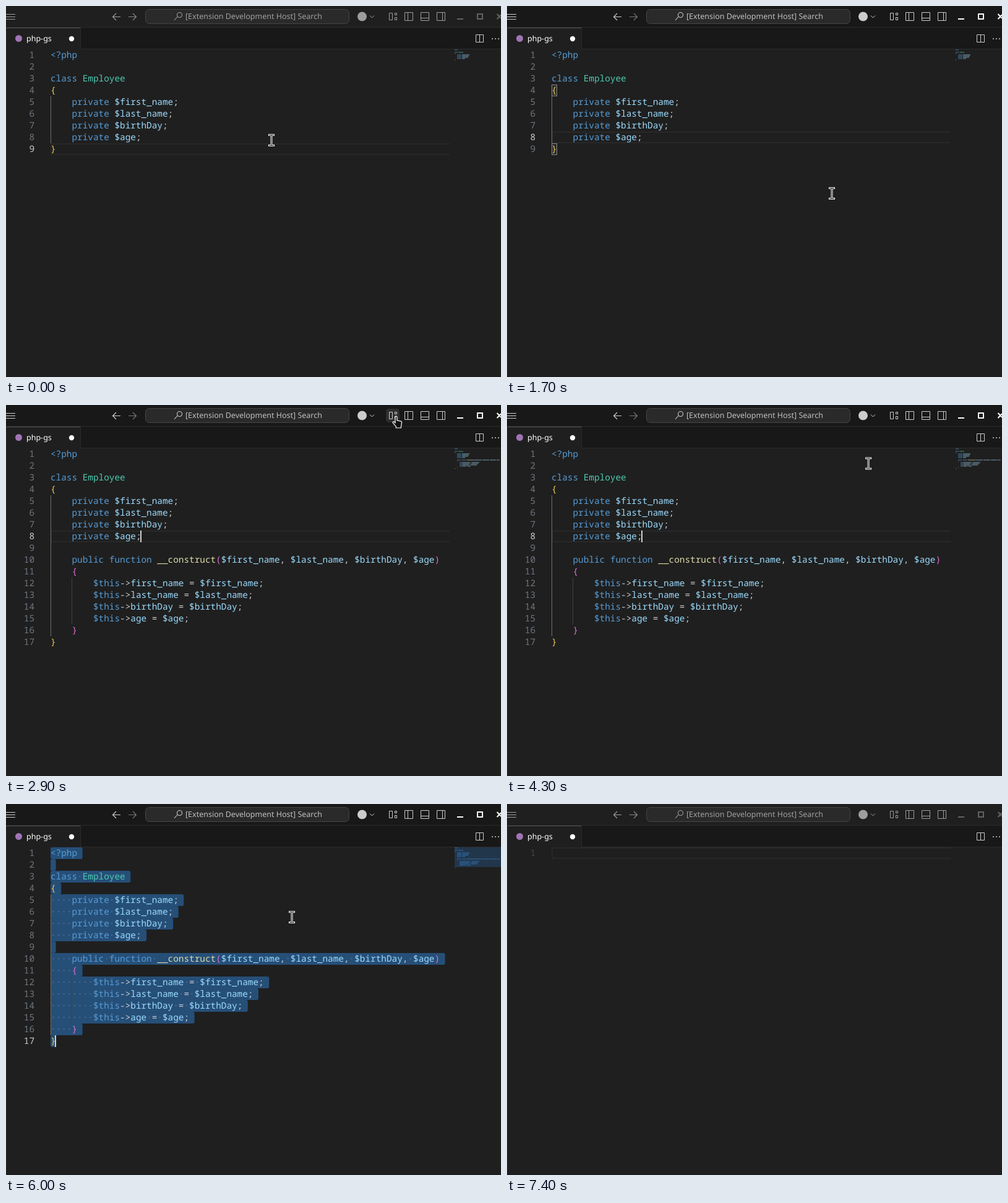
An HTML page for the animation above (8 s loop, 800 px wide and 600 px high).

```html
<!DOCTYPE html>
<html lang="en">
<head>
<meta charset="utf-8">
<title>Generate constructor</title>
<style>
html, body { margin: 0; width: 100%; height: 100%; overflow: hidden; background: #1f1f1f; }
svg { display: block; width: 800px; height: 600px; }
text { font: 12.5px "Noto Sans", "Open Sans", sans-serif; white-space: pre; text-rendering: geometricPrecision; }
.code { font: 14.36px "Noto Sans Mono", "DejaVu Sans Mono", monospace; }
.small { font-size: 11.3px; }
.end { text-anchor: end; }
.mid { text-anchor: middle; }
.popup { filter: drop-shadow(0 0 5px #0009); }
</style>
</head>
<body>
<svg id="stage" viewBox="0 0 800 600"></svg>
<script>
const stage = document.getElementById('stage');
const LOOP = 8000, STEP = 100;
const LEFT = 72, TOP = 70, ROW = 19, CHAR = 8.616;

const fields = ['first_name', 'last_name', 'birthDay', 'age'];
const head = ['<?php', '', 'class Employee', '{', ...fields.map(f => `    private $${f};`)];
const shortCode = [...head, '}'];
const fullCode = [...head, '',
  `    public function __construct(${fields.map(f => '$' + f).join(', ')})`,
  '    {', ...fields.map(f => `        $this->${f} = $${f};`), '    }', '}'];

const menu = [
  [236, 'Change All Occurrences', 'Ctrl+F2'], [262, 'Refactor...', 'Ctrl+Shift+R'],
  [299, 'Generate Constructor', ''], [325, 'Generate Getters', ''],
  [351, 'Generate Setters', ''], [377, 'Generate Getters and Setters', ''],
  [414, 'Cut', 'Ctrl+X'], [440, 'Copy', 'Ctrl+C'], [466, 'Paste', 'Ctrl+V'],
  [503, 'Command Palette...', 'Ctrl+Shift+P']];

// Pointer path: time, x, y
const moves = [
  [0, 429, 217], [900, 429, 217], [1100, 503, 276], [1500, 525, 303], [1700, 525, 303],
  [2300, 638, 52], [2500, 631, 18], [2900, 631, 18], [3000, 676, 23], [3300, 676, 23],
  [3500, 672, 28], [4000, 672, 28], [4700, 467, 183], [5000, 467, 183], [5100, 462, 183],
  [6100, 462, 183], [6600, 820, 120], [LOOP, 820, 120]];

const esc = s => s.replace(/&/g, '&amp;').replace(/</g, '&lt;').replace(/>/g, '&gt;');
const rect = (x, y, w, h, fill, more = '') =>
  `<rect x="${x}" y="${y}" width="${w}" height="${h}" fill="${fill}" ${more}/>`;
const path = (d, stroke, width = 1, fill = 'none') =>
  `<path d="${d}" stroke="${stroke}" stroke-width="${width}" fill="${fill}"/>`;
const text = (x, y, s, fill, cls = '') =>
  `<text x="${x}" y="${y}" fill="${fill}" class="${cls}">${esc(s)}</text>`;
const circle = (x, y, r, fill) => `<circle cx="${x}" cy="${y}" r="${r}" fill="${fill}"/>`;
const rowTop = n => TOP + (n - 1) * ROW;

function pointerAt(t) {
  const i = moves.findIndex(m => m[0] > t);
  const [t0, x0, y0] = moves[i - 1], [t1, x1, y1] = moves[i];
  const k = (t - t0) / (t1 - t0);
  return [x0 + (x1 - x0) * k, y0 + (y1 - y0) * k];
}

function tokens(line) {
  return line.match(/<\?php|\$?\w+|\s+|->|./g) || [];
}

function tokenColor(tok, line) {
  if (/^(<\?php|class|private|public|function|\$this)$/.test(tok)) return '#569cd6';
  if (tok === 'Employee') return '#4ec9b0';
  if (tok === '__construct') return '#dcdcaa';
  if (/^\$?\w/.test(tok)) return '#9cdcfe';
  if (/[{}]/.test(tok) && line.length === 1) return '#e9c94a';
  return /[(){}]/.test(tok) ? '#da70d6' : '#cccccc';
}

function titleBar(focused, hoverX) {
  const fg = focused ? '#cccccc' : '#9d9d9d', win = focused ? '#ffffff' : '#636363';
  const panel = x => `M${x - 6.5} 10.5h13v13h-13z`;
  return rect(0, 0, 800, 35, focused ? '#181818' : '#1f1f1f') + rect(0, 34, 800, 1, '#2b2b2b')
    + (hoverX ? rect(hoverX - 11, 6, 22, 22, '#2f2f2f', 'rx="5"') : '')
    + path('M0 13.5h15M0 17.5h15M0 21.5h15', fg)
    + path('M185 17.5h-12M178 12l-5.5 5.5 5.5 5.5', fg, 1.2)
    + path('M198 17.5h12M205 12l5.5 5.5-5.5 5.5', focused ? '#777777' : '#888888', 1.2)
    + rect(225.5, 5.5, 329, 23, '#2a2a2a', 'rx="6" stroke="#454545"')
    + path('M272 23l5-5.5M276.5 14.5a4 4 0 1 1 8 0a4 4 0 1 1-8 0', fg, 1.1)
    + text(290, 21, '[Extension Development Host] Search', focused ? '#c0c0c0' : '#a0a0a0')
    + circle(575.5, 17, 7.5, fg)
    + path('M588 15.5l3.5 3.5 3.5-3.5', fg)
    + path('M619.5 11.5h5v11h-5zM628.5 11.5h3v3h-3zM628.5 18.5h3v4h-3z', fg)
    + path(panel(651) + 'M649.5 11v12', fg) + path(panel(677) + 'M671 19.5h12', fg)
    + path(panel(703) + 'M705.5 11v12', fg)
    + path('M729 21h10M762 13h8v8h-8zM793.5 13l8 8M793.5 21l8-8', win, 2);
}

function tabBar() {
  return rect(0, 35, 800, 35, '#181818') + rect(0, 69, 800, 1, '#2b2b2b')
    + rect(0, 35, 120, 35, '#1f1f1f') + rect(120, 35, 1, 35, '#2b2b2b')
    + rect(0, 35, 120, 1, '#555555') + rect(0, 35, 1, 565, '#2b2b2b')
    + circle(20.5, 52.5, 5.5, '#a074b4')
    + text(33, 57, 'php-gs', '#ffffff') + circle(106, 53, 4.2, '#ffffff')
    + path('M759.5 46.5h12v12h-12zM765.5 46v13', '#cccccc')
    + [786, 791, 796].map(x => circle(x, 53, 1, '#cccccc')).join('');
}

function minimap(lines, selected, slider) {
  let out = slider ? rect(717, 70, 83, 57, '#797979', `opacity="${.2 * slider}"`) : '';
  if (selected) out += rect(725, 70, 75, lines.length * 2 - 2, '#264f78', 'opacity=".5"');
  lines.forEach((line, i) => {
    let x = 725;
    for (const tok of tokens(line)) {
      if (tok.trim()) {
        const fill = selected ? '#2f6aa3' : tokenColor(tok, line);
        out += rect(x, TOP + i * 2 + .3, tok.length, 1.3, fill, `opacity="${selected ? .8 : .5}"`);
      }
      x += tok.length;
    }
  });
  return out;
}

function editor(lines, active, selected, matched) {
  let out = '';
  if (selected) {
    lines.forEach((line, i) => {
      const cols = line.length + (i < lines.length - 1 ? 1 : 0);
      out += rect(LEFT, rowTop(i + 1), cols * CHAR, ROW, '#264f78', 'rx="3"');
    });
  } else {
    out += path(`M717 ${rowTop(active) + 1}H73v17H717`, '#282828', 2);
  }
  if (lines.length > 1) out += rect(LEFT, rowTop(5), 1, (lines.length - 5) * ROW, '#707070');
  if (lines === fullCode) out += rect(106, rowTop(12), 1, 4 * ROW, '#404040');
  if (matched) {
    for (const n of [4, lines.length])
      out += rect(72.5, rowTop(n) + .5, 8, 18, '#2b2b2b', 'stroke="#888888"');
  }
  lines.forEach((line, i) => {
    const base = rowTop(i + 1) + 14;
    const dim = lines.length === 1 ? '#444444' : '#6e7681';
    const lit = i + 1 === active && lines.length > 1;
    out += text(46, base, String(i + 1), lit ? '#cccccc' : dim, 'code end');
    const spans = tokens(line).map(tok => {
      const blank = !tok.trim();
      const shown = blank && selected ? '·'.repeat(tok.length) : tok;
      return `<tspan fill="${blank ? '#56779a' : tokenColor(tok, line)}">${esc(shown)}</tspan>`;
    });
    out += `<text class="code" x="${LEFT}" y="${base}">${spans.join('')}</text>`;
  });
  return out;
}

function caret(line, col) {
  return rect(Math.floor(LEFT + col * CHAR - 1), rowTop(line), 2, ROW, '#d0d0d0');
}

function contextMenu(y) {
  let out = '<g class="popup">' + rect(428.5, 218.5, 295, 302, '#1f1f1f', 'rx="5" stroke="#454545"') + '</g>'
    + path('M429 280.5h294M429 395.5h294M429 484.5h294', '#454545');
  // The last row the pointer reached stays lit across a separator.
  const hot = y < 223 ? -1 : menu.filter(m => m[0] - 13 <= y).length - 1;
  menu.forEach(([cy, label, keys], i) => {
    const fill = i === hot ? '#ffffff' : '#cccccc';
    if (i === hot) out += rect(433, cy - 13, 286, 26, '#0078d4', 'rx="3"');
    out += text(459, cy + 5, label, fill) + text(693, cy + 5, keys, fill, 'end');
  });
  return out;
}

function checkbox(x, y) {
  return rect(x, y, 13, 13, '#1677e8', 'rx="2"') + path(`M${x + 3} ${y + 6.5}l2.7 3 4.6-6`, '#ffffff', 2);
}

function quickPick(caretOn) {
  let out = '<g class="popup">' + rect(117.5, 6.5, 535, 131, '#222222', 'rx="6" stroke="#3a3a3a"') + '</g>'
    + checkbox(124, 21)
    + rect(142.5, 15.5, 469, 24, '#313131', 'stroke="#0078d4"')
    + text(149, 32, 'Select properties to generate constructor arguments', '#989898')
    + (caretOn ? rect(149, 19, 1, 17, '#cccccc') : '')
    + rect(548, 18, 60, 18, '#616161', 'rx="2"') + text(578, 31, '4 Selected', '#f8f8f8', 'small mid')
    + rect(618, 15, 28, 25, '#0078d4', 'rx="2"') + text(632, 31.5, 'OK', '#ffffff', 'small mid')
    + rect(124, 44, 523, 22, '#2a2d2e', 'rx="3"')
    + text(633, 59, 'class Employee', '#3794ff', 'end');
  fields.forEach((f, i) => {
    const y = 59 + i * 22;
    out += checkbox(129, y - 10)
      + `<text x="152" y="${y}" fill="#cccccc">$${f}<tspan class="small" dx="6" fill="#9d9d9d">private</tspan></text>`;
  });
  return out;
}

function pointer(kind, x, y) {
  const shapes = {
    arrow: path('M0 0V16l4-3.5 2.6 6 2.8-1.2-2.6-5.8h5z', '#ffffff', 1.2, '#111111'),
    hand: path('M-2 11V1.6a1.5 1.5 0 0 1 3 0V7l6 1.2q1.6.4 1.6 2l-1.1 6.5v2.3h-8.2v-2.3l-5-5.8q-.6-2 1.4-2z',
      '#ffffff', 1.2, '#111111'),
    beam: path('M-5 -8.5H5M-5 8.5H5M0 -9V9', '#ffffff', 3) + path('M-4 -8.5H4M-4 8.5H4M0 -8V8', '#111111', 1)
  };
  return `<g transform="translate(${x} ${y})">${shapes[kind]}</g>`;
}

function pointerKind(t, y) {
  if (t >= 700 && t < 1700) return 'arrow';
  if (y > 138 || t >= 4100 && y > 70 || t < 700) return 'beam';
  return t < 4100 ? 'hand' : 'arrow';
}

function scene(t) {
  const within = (a, b) => t >= a && t < b;
  const [x, y] = pointerAt(t);
  const lines = t < 2800 ? shortCode : t < 6800 ? fullCode : [''];
  const selected = within(6000, 6800);
  const active = t < 700 ? 9 : t < 5200 ? 8 : t < 6000 ? 6 : t < 6800 ? 17 : 1;
  const hover = within(2700, 3000) ? 625 : within(3000, 4100) ? 677 : 0;
  const slider = within(6500, 6800) ? Math.min(1, (t - 6400) / 200) : 0;

  let out = rect(0, 0, 800, 600, '#1f1f1f')
    + titleBar(within(700, 7400), hover) + tabBar()
    + editor(lines, active, selected, within(700, 1800) || within(5200, 6000))
    + minimap(lines, selected, slider);
  if (within(2900, 3400) || within(3900, 4400) || within(4900, 5200)) out += caret(8, 17);
  if (within(5200, 5700)) out += caret(6, 23);
  if (within(6000, 6500)) out += caret(17, 1);
  if (within(6800, 7300)) out += caret(1, 0);
  if (within(800, 1700)) out += contextMenu(y);
  if (within(1900, 2700)) out += quickPick(within(1900, 2400));
  return out + pointer(pointerKind(t, y), x, y);
}

let shown = -1;
function tick() {
  const t = Math.floor(performance.now() % LOOP / STEP) * STEP;
  if (t !== shown) stage.innerHTML = scene(shown = t);
  requestAnimationFrame(tick);
}
tick();
</script>
</body>
</html>
```
